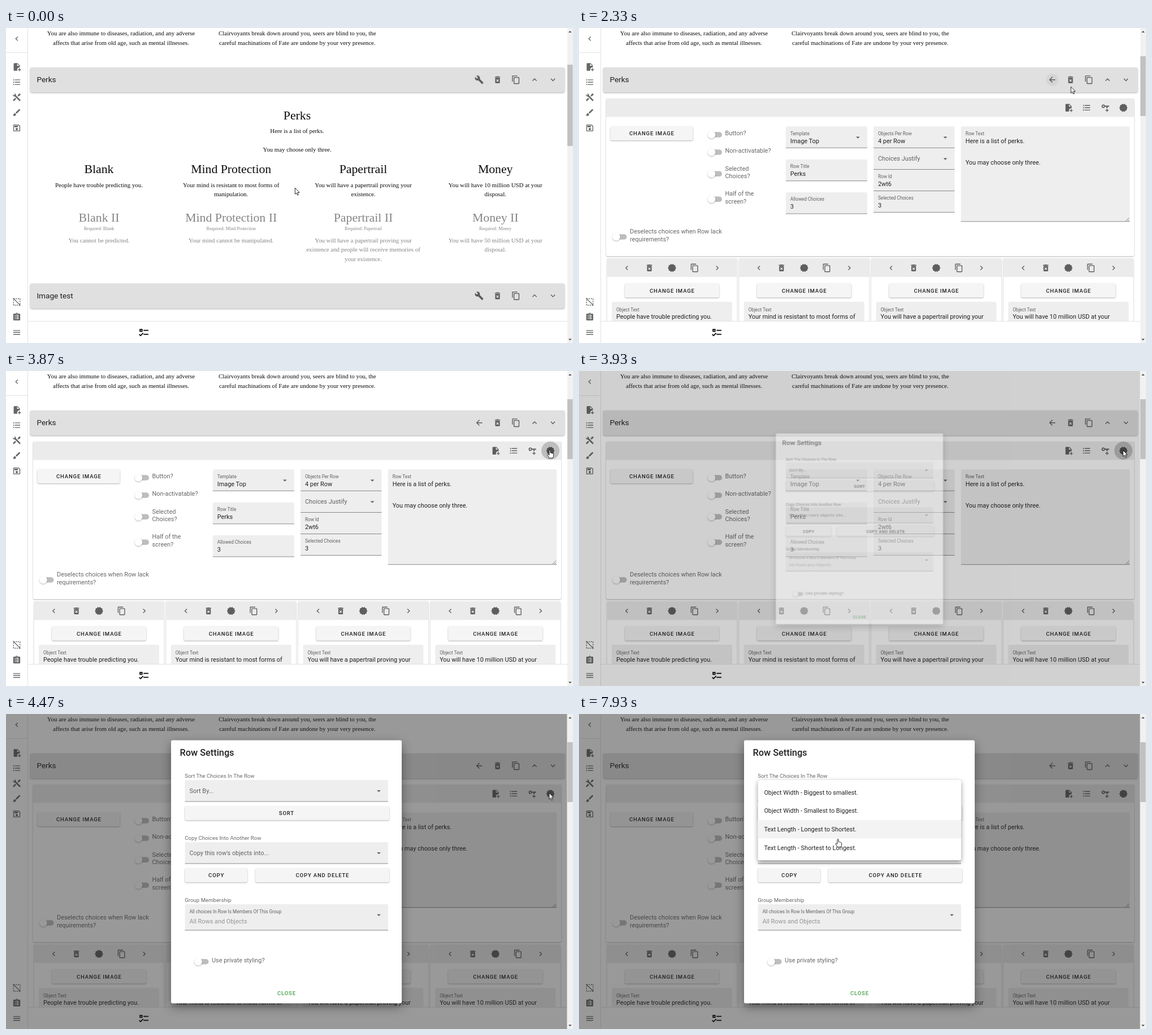
These frames come from a looping animation (1003x558 px, 8000 ms). An HTML page:

```html
<!DOCTYPE html>
<html lang="en">
<head>
<meta charset="utf-8">
<title>Row settings</title>
<style>
html, body { margin: 0; width: 100%; height: 100%; overflow: hidden; background: #fff; }
svg { display: block; }
text { font-family: Roboto, sans-serif; font-size: 10.88px; fill: rgba(0,0,0,.87); white-space: pre; }
.serif { font-family: "Liberation Serif", "Times New Roman", serif; fill: #0c0c0c; }
.h { font-size: 21.76px; }
.req { font-size: 8.16px; }
.bar { font-size: 13.6px; }
.small { font-size: 8.16px; fill: rgba(0,0,0,.6); }
.dim { fill: rgba(0,0,0,.6); }
.off { fill: rgba(0,0,0,.38); }
.btn { font-size: 9.52px; font-weight: 500; letter-spacing: .85px; }
.cap { font-size: 9.52px; letter-spacing: .068px; fill: rgba(0,0,0,.6); }
.title { font-size: 16.32px; font-weight: 500; }
.green { fill: #43a047; }
.mid { text-anchor: middle; }
.locked { opacity: .5; }
.icon { fill: rgba(0,0,0,.6); fill-rule: evenodd; }
.lift { filter: drop-shadow(0 1.5px 1.5px rgba(0,0,0,.32)); }
.card { filter: drop-shadow(0 1px 1.2px rgba(0,0,0,.3)); }
.deep { filter: drop-shadow(0 6px 9px rgba(0,0,0,.4)); }
.pop { filter: drop-shadow(0 3px 4px rgba(0,0,0,.4)); }

.anim { animation: 8s linear infinite; }
.step { animation-timing-function: step-end; }
#view { animation-name: view; }
#edit { animation-name: edit; }
#hover1 { animation-name: hover1; }
#ripple1 { animation-name: ripple1; transform-origin: 837px 92px; }
#back { animation-name: back; }
#keyHover { animation-name: keyHover; }
#gearHover { animation-name: gearHover; }
#shade { animation-name: shade; }
#dialog { animation-name: dialog; transform-origin: 496px 279.5px; }
#selHover { animation-name: selHover; }
#under { animation-name: under; transform-origin: 496px 0; }
#menu { animation-name: menu; }
#item { animation-name: item; }
#cursor { animation-name: move; }
#arrow { animation-name: arrow; }
#hand { animation-name: hand; }

@keyframes view { 0% { visibility: visible } 25.875%, 100% { visibility: hidden } }
@keyframes edit { 0% { visibility: hidden } 25.875%, 100% { visibility: visible } }
@keyframes hover1 {
  0%, 16% { opacity: 0 } 17%, 20.6% { opacity: .08 } 22.4%, 100% { opacity: .16 }
}
@keyframes ripple1 {
  0%, 20.4% { opacity: 0; transform: scale(.2) }
  22.4%, 100% { opacity: .1; transform: scale(1) }
}
@keyframes back { 0% { opacity: .12 } 46.625%, 100% { opacity: 0 } }
@keyframes keyHover {
  0%, 35.6% { opacity: 0 } 36.4%, 37.6% { opacity: .06 } 38.6%, 100% { opacity: 0 }
}
@keyframes gearHover {
  0%, 38.4% { opacity: 0 } 40%, 46.5% { opacity: .08 }
  48.5%, 49.2% { opacity: .2 } 52.4%, 100% { opacity: 0 }
}
@keyframes shade {
  0%, 48.5% { opacity: 0; animation-timing-function: cubic-bezier(.25,.8,.5,1) }
  52.25%, 100% { opacity: .46 }
}
@keyframes dialog {
  0%, 48.5% { opacity: 0; transform: scale(.5); animation-timing-function: cubic-bezier(.25,.8,.5,1) }
  52.25%, 100% { opacity: 1; transform: none }
}
@keyframes selHover { 0%, 61.5% { opacity: 0 } 63%, 100% { opacity: 1 } }
@keyframes under {
  0%, 74.75% { transform: scaleX(0) } 75% { transform: scaleX(.075) } 78.4%, 100% { transform: scaleX(1) }
}
@keyframes menu { 0%, 75.2% { opacity: 0 } 78.375%, 100% { opacity: 1 } }
@keyframes item {
  0% { transform: none } 91.9% { transform: translateY(32.6px) } 95.5%, 100% { transform: translateY(65.2px) }
}
@keyframes arrow {
  0% { visibility: visible } 16.1% { visibility: hidden } 27.3% { visibility: visible }
  35.8% { visibility: hidden } 48.5% { visibility: visible } 61.6%, 100% { visibility: hidden }
}
@keyframes hand {
  0% { visibility: hidden } 16.1% { visibility: visible } 27.3% { visibility: hidden }
  35.8% { visibility: visible } 48.5% { visibility: hidden } 61.6%, 100% { visibility: visible }
}
@keyframes move {
  0%, 6.625% { transform: translate(511px,283px); animation-timing-function: cubic-bezier(.4,.1,.4,1) }
  16.625%, 25.875% { transform: translate(837.5px,91px); animation-timing-function: cubic-bezier(.4,.1,.4,1) }
  35.875%, 36.625% { transform: translate(931px,128px); animation-timing-function: ease-out }
  40% { transform: translate(961px,138.5px) }
  42.5%, 49.2% { transform: translate(962px,140px) }
  52%, 55.875% { transform: translate(960.5px,139.5px); animation-timing-function: ease-in }
  58.75% { transform: translate(840px,159px) }
  62.5% { transform: translate(590px,135px); animation-timing-function: ease-out }
  65.875%, 66.625% { transform: translate(499px,142px); animation-timing-function: ease-out }
  68.375%, 90% { transform: translate(477.5px,140px); animation-timing-function: ease-in-out }
  92.5% { transform: translate(582px,160px); animation-timing-function: ease-in-out }
  95.6% { transform: translate(338px,190px); animation-timing-function: ease-in-out }
  99.125%, 100% { transform: translate(458px,221.5px) }
}
</style>
</head>
<body>
<svg id="stage" width="1003" height="558" viewBox="0 0 1003 558"></svg>
<script>
const dots = [6, 12, 18].map(y => `M4 ${y - 1.5}a1.5 1.5 0 1 1 0 3a1.5 1.5 0 1 1 0-3M7 ${y - 1}H21V${y + 1}H7Z`).join('');
const rows = [7, 11, 15].map(y => `M7 ${y}H9V${y + 2}H7ZM11 ${y}H17V${y + 2}H11Z`).join('');
const paths = {
  left: 'M15.41 16.58L10.83 12L15.41 7.41L14 6L8 12L14 18Z',
  right: 'M8.59 16.58L13.17 12L8.59 7.41L10 6L16 12L10 18Z',
  up: 'M7.41 15.41L12 10.83L16.59 15.41L18 14L12 8L6 14Z',
  down: 'M7.41 8.58L12 13.17L16.59 8.58L18 10L12 16L6 10Z',
  caret: 'M7 10L12 15L17 10Z',
  wrench: 'M22.7 19L13.6 9.9C14.5 7.6 14 4.9 12.1 3C10.1 1 7.1 .6 4.7 1.7L9 6L6 9L1.6 4.7C.4 7.1 .9 10.1 2.9 12.1C4.8 14 7.5 14.5 9.8 13.6L18.9 22.7C19.3 23.1 19.9 23.1 20.3 22.7L22.6 20.4C23.1 20 23.1 19.3 22.7 19Z',
  trash: 'M6 19A2 2 0 0 0 8 21H16A2 2 0 0 0 18 19V7H6ZM8.46 11.88L9.87 10.47L12 12.59L14.12 10.47L15.53 11.88L13.41 14L15.53 16.12L14.12 17.53L12 15.41L9.88 17.53L8.47 16.12L10.59 14ZM15.5 4L14.5 3H9.5L8.5 4H5V6H19V4Z',
  copy: 'M19 21H8V7H19M19 5H8A2 2 0 0 0 6 7V21A2 2 0 0 0 8 23H19A2 2 0 0 0 21 21V7A2 2 0 0 0 19 5M16 1H4A2 2 0 0 0 2 3V17H4V3H16Z',
  back: 'M20 11V13H8L13.5 18.5L12.08 19.92L4.16 12L12.08 4.08L13.5 5.5L8 11Z',
  list: dots,
  file: 'M14 2H6C4.89 2 4 2.89 4 4V20C4 21.11 4.89 22 6 22H13.81C13.28 21.09 13 20.05 13 19C13 15.69 15.69 13 19 13C19.34 13 19.67 13.03 20 13.08V8L14 2M13 9V3.5L18.5 9H13M23 20H20V23H18V20H15V18H18V15H20V18H23Z',
  tools: 'M21.71 20.29L20.29 21.71A1 1 0 0 1 18.88 21.71L7 9.85A3.81 3.81 0 0 1 6 10A4 4 0 0 1 2.22 4.7L4.76 7.24L7.24 4.76L4.7 2.22A4 4 0 0 1 10 6A3.81 3.81 0 0 1 9.85 7L21.71 18.88A1 1 0 0 1 21.71 20.29M2.29 18.88A1 1 0 0 0 2.29 20.29L3.71 21.71A1 1 0 0 0 5.12 21.71L10.59 16.25L7.76 13.42ZM20 2L16 4V6L13.83 8.17L15.83 10.17L18 8H20L22 4Z',
  brush: 'M20.71 4.63L19.37 3.29C19 2.9 18.35 2.9 17.96 3.29L9 12.25L11.75 15L20.71 6.04C21.1 5.65 21.1 5 20.71 4.63M7 14A3 3 0 0 0 4 17C4 18.31 2.84 19 2 19C2.92 20.22 4.5 21 6 21A4 4 0 0 0 10 17A3 3 0 0 0 7 14Z',
  save: 'M17 3H5C3.89 3 3 3.9 3 5V19C3 20.1 3.89 21 5 21H19C20.1 21 21 20.1 21 19V7L17 3M19 19H5V5H16.17L19 7.83ZM12 12C10.34 12 9 13.34 9 15S10.34 18 12 18 15 16.66 15 15 13.66 12 12 12M6 6H15V10H6Z',
  board: 'M19 3H14.82C14.4 1.84 13.3 1 12 1S9.6 1.84 9.18 3H5A2 2 0 0 0 3 5V19A2 2 0 0 0 5 21H19A2 2 0 0 0 21 19V5A2 2 0 0 0 19 3M12 3a1 1 0 1 1 0 2a1 1 0 1 1 0-2' + rows,
  menu: 'M3 6H21V8H3ZM3 11H21V13H3ZM3 16H21V18H3Z',
  gear: 'M23 12L20.56 9.22L20.9 5.54L17.29 4.72L15.4 1.54L12 3L8.6 1.54L6.71 4.72L3.1 5.53L3.44 9.21L1 12L3.44 14.78L3.1 18.47L6.71 19.29L8.6 22.47L12 21L15.4 22.46L17.29 19.28L20.9 18.46L20.56 14.78Z',
  key: 'M7 3.5a4.5 4.5 0 1 0 4.2 6H15V13H18V9.5H22V6.5H11.2A4.5 4.5 0 0 0 7 3.5M7 6a2 2 0 1 1 0 4a2 2 0 1 1 0-4M15.5 14.5V17.5H12.5V19.5H15.5V22.5H17.5V19.5H20.5V17.5H17.5V14.5Z',
  checks: 'M3 5H9V11H3V5M5 7V9H7V7H5M11 7H21V9H11V7M11 15H21V17H11V15M5 20L1.5 16.5L2.91 15.09L5 17.17L9.59 12.59L11 14Z'
};

const txt = (x, y, s, c = '') => `<text x="${x}" y="${y}" class="${c}">${s}</text>`;
const box = (x, y, w, h, fill, extra = '') => `<rect x="${x}" y="${y}" width="${w}" height="${h}" fill="${fill}" ${extra}/>`;
const icon = (name, x, y, size = 16.32, extra = '') =>
  `<path class="icon" ${extra} transform="translate(${x - size / 2} ${y - size / 2}) scale(${size / 24})" d="${paths[name]}"/>`;
const icons = (list, y) => list.map(([n, x]) => icon(n, x, y)).join('');
const disc = (id, x, y, r) => `<circle id="${id}" class="anim" cx="${x}" cy="${y}" r="${r}"/>`;
const button = (x, y, w, label) =>
  box(x, y, w, 25, '#f5f5f5', 'rx="2.7" class="card"') + txt(x + w / 2 + .4, y + 16, label, 'btn mid');
const toggle = (x, y) =>
  box(x - 6, y - 4.7, 24.5, 9.5, '#bdbdbd', 'rx="4.75"') +
  `<circle cx="${x}" cy="${y}" r="6.8" fill="#fff" class="card"/>`;
const plain = (x, y, w, h) =>
  `<path d="M${x} ${y + h}V${y + 2.7}q0-2.7 2.7-2.7H${x + w - 2.7}q2.7 0 2.7 2.7V${y + h}Z" fill="rgba(0,0,0,.065)"/>` +
  box(x, y + h - 1, w, 1, 'rgba(0,0,0,.42)');
const field = (x, y, w, label, value, caret) =>
  plain(x, y, w, 38.5) + txt(x + 8, y + 15.4, label, 'small') + txt(x + 8, y + 29.4, value) +
  (caret ? icon('caret', x + w - 16.5, y + 19.5) : '');
const select = (x, y, w, label) =>
  plain(x, y, w, 38.5) + txt(x + 8, y + 22.8, label, 'dim') + icon('caret', x + w - 16.5, y + 19.3);

const cols = [164.5, 398.2, 632, 865.7];
const tools = [['trash', 869.5], ['copy', 902], ['up', 935], ['down', 967.5]];
const rowBar = (y, name) =>
  box(43, y, 945, 44, '#e0e0e0', 'rx="2.7" class="lift"') + txt(54.4, y + 26.4, name, 'bar') + icons(tools, y + 21.7);

function perk(cx, name, lines, lines2) {
  const body = (arr, y) => arr.map((s, i) => txt(cx, y + i * 16.32, s, 'serif mid')).join('');
  return txt(cx, 257, name, 'serif h mid') + body(lines, 282) +
    `<g class="locked">${txt(cx, 343, name + ' II', 'serif h mid')}${txt(cx, 357.5, 'Required: ' + name, 'serif req mid')}${body(lines2, 380)}</g>`;
}

const page = [
  txt(203.5, 13.2, 'You are also immune to diseases, radiation, and any adverse', 'serif mid'),
  txt(203.5, 29.5, 'affects that arise from old age, such as mental illnesses.', 'serif mid'),
  txt(515.3, 13.2, 'Clairvoyants break down around you, seers are blind to you, the', 'serif mid'),
  txt(515.3, 29.5, 'careful machinations of Fate are undone by your very presence.', 'serif mid'),
  rowBar(70, 'Perks')
].join('');

const view = [
  disc('hover1', 837, 92, 16), disc('ripple1', 837, 92, 9),
  icon('wrench', 837, 91.7),
  txt(515, 161.6, 'Perks', 'serif h mid'),
  txt(515, 186.2, 'Here is a list of perks.', 'serif mid'),
  txt(515, 218.8, 'You may choose only three.', 'serif mid'),
  perk(cols[0], 'Blank', ['People have trouble predicting you.'], ['You cannot be predicted.']),
  perk(cols[1], 'Mind Protection', ['Your mind is resistant to most forms of', 'manipulation.'], ['Your mind cannot be manipulated.']),
  perk(cols[2], 'Papertrail', ['You will have a papertrail proving your', 'existence.'],
    ['You will have a papertrail proving your', 'existence and people will receive memories of', 'your existence.']),
  perk(cols[3], 'Money', ['You will have 10 million USD at your', 'disposal.'], ['You will have 50 million USD at your', 'disposal.']),
  rowBar(452.7, 'Image test'), icon('wrench', 837, 474.4)
].join('');

const objectCard = (cx, text) =>
  `<g class="card">${box(cx - 115, 408, 230, 160, '#fff', 'rx="2.7"')}</g>` + box(cx - 115, 408, 230, 33, '#ebebeb') +
  icons([['left', cx - 80], ['trash', cx - 40], ['gear', cx], ['copy', cx + 40], ['right', cx + 80]], 425) +
  button(cx - 83.5, 452.5, 167, 'CHANGE IMAGE') +
  plain(cx - 106.5, 485, 213, 80) + txt(cx - 98.5, 501.5, 'Object Text', 'small') + txt(cx - 98.5, 514.6, text);

const edit = [
  disc('back', 837, 91.7, 11), icon('back', 837, 91.7),
  box(48, 125, 934, 279, '#fff', 'rx="2.7" class="card"'), box(48, 125, 934, 32.5, '#ebebeb'),
  disc('keyHover', 931, 141, 16), disc('gearHover', 963, 141, 16),
  icons([['file', 866], ['list', 898], ['key', 931], ['gear', 963]], 141.3),
  button(55.5, 174, 146, 'CHANGE IMAGE'),
  toggle(234.5, 189), toggle(234.5, 220), toggle(234.5, 258.3), toggle(234.5, 303.3), toggle(66, 370),
  ...[[258.5, 190, 'Button?'], [258.5, 221, 'Non-activatable?'], [258.5, 252.7, 'Selected'], [258.5, 266.3, 'Choices?'],
    [258.5, 297.3, 'Half of the'], [258.5, 311, 'screen?'],
    [90, 363.9, 'Deselects choices when Row lack'], [90, 377.5, 'requirements?']].map(a => txt(...a, 'dim')),
  field(365.8, 174.3, 144, 'Template', 'Image Top', true),
  field(365.8, 232.8, 144, 'Row Title', 'Perks'),
  field(365.8, 291, 144, 'Allowed Choices', '3'),
  field(521, 174.3, 143.5, 'Objects Per Row', '4 per Row', true),
  select(521, 212.5, 143.5, 'Choices Justify'),
  field(521, 250.5, 143.5, 'Row Id', '2wt6'),
  field(521, 288.5, 143.5, 'Selected Choices', '3'),
  plain(675.7, 174.3, 298.5, 169),
  txt(683.7, 189.7, 'Row Text', 'small'), txt(683.7, 203.7, 'Here is a list of perks.'), txt(683.7, 241.8, 'You may choose only three.'),
  '<path d="M967 342L973 336M970.5 342L973 339.5" stroke="#666" stroke-width=".8"/>',
  objectCard(cols[0], 'People have trouble predicting you.'),
  objectCard(cols[1], 'Your mind is resistant to most forms of'),
  objectCard(cols[2], 'You will have a papertrail proving your'),
  objectCard(cols[3], 'You will have 10 million USD at your')
].join('');

const frame = [
  box(38, 519, 955, 1, '#e4e4e4'), box(38, 520, 955, 38, '#fff'),
  icon('checks', 244.1, 539.2, 20.9, 'style="fill:#000"'),
  box(0, 0, 38, 558, '#fff'), box(38, 0, 1, 558, '#e2e2e2'), box(0, 43, 38, 1, '#e2e2e2'),
  ...[['left', 19], ['file', 69], ['list', 96], ['tools', 122.7], ['brush', 149.7], ['save', 177], ['board', 512], ['menu', 539.3]]
    .map(([n, y]) => icon(n, 19, y)),
  '<g fill="none" stroke="#666" stroke-width="1.3"><rect x="13.3" y="479.5" width="11.5" height="11.5" stroke-dasharray="2.2 1.63"/><path d="M12.5 478.5L25.5 491.5"/></g>'
].join('');

const thumb = (y, h) => box(993, y, 9.5, h, '#c1c1c1');
const scroll = box(993, 0, 10, 558, '#f1f1f1') +
  '<path d="M995 8L997.8 5L1000.6 8ZM995 550.5L997.8 553.5L1000.6 550.5Z" fill="#505050"/>';

const dialog = [
  box(292, 46.5, 408, 466, '#fff', 'rx="2.7" class="deep"'),
  txt(307.5, 74, 'Row Settings', 'title'),
  txt(316.3, 113.3, 'Sort The Choices In The Row', 'cap'),
  select(316.5, 117, 359.5, 'Sort By...'),
  `<g id="selHover" class="anim">${box(316.5, 117, 359.5, 37.5, 'rgba(0,0,0,.075)')}${box(316.5, 154.5, 359.5, 1, 'rgba(0,0,0,.6)')}</g>`,
  '<g id="under" class="anim">' + box(316.5, 154, 359.5, 1.5, '#111') + '</g>',
  button(316.5, 163, 361.5, 'SORT').replace('x="497.65"', 'x="496.4"'),
  txt(316.3, 223, 'Copy Choices Into Another Row', 'cap'),
  select(316.5, 227, 359.5, "Copy this row's objects into..."),
  button(316.5, 273, 110.5, 'COPY'), button(441, 273, 237, 'COPY AND DELETE'),
  txt(316.3, 332.8, 'Group Membership', 'cap'),
  plain(316.5, 337, 359.5, 46.5),
  txt(324.5, 353.2, 'All choices In Row Is Members Of This Group', 'small'),
  txt(324.5, 370.7, 'All Rows and Objects', 'off'), icon('caret', 659.5, 356),
  toggle(340, 438.7), txt(364, 440, 'Use private styling?', 'dim'),
  txt(496.4, 498.4, 'CLOSE', 'btn mid green')
].join('');

const options = ['Object Width - Biggest to smallest.', 'Object Width - Smallest to Biggest.',
  'Text Length - Longest to Shortest.', 'Text Length - Shortest to Longest.'];
const menu = box(316.5, 117, 359.5, 142, '#fff', 'rx="2.7" class="pop"') +
  '<g id="item" class="anim step">' + box(316.5, 122.6, 359.5, 32.6, '#f3f3f3') + '</g>' +
  options.map((s, i) => txt(327.4, 142.7 + i * 32.6, s)).join('');

const pointer = (id, d) => `<path id="${id}" class="anim step" d="${d}" fill="#fff" stroke="#111" stroke-width=".9" stroke-linejoin="round"/>`;
const cursor =
  pointer('arrow', 'M.3 .3V11.4L2.8 9.1L4.5 13.1L6.4 12.3L4.7 8.4H8.1Z') +
  pointer('hand', 'M-1.1 1.3a1.1 1.1 0 0 1 2.2 0V5.2c.9-.6 1.8-.4 2 .4 .9-.5 1.8-.1 1.9.7 .9-.3 1.6.1 1.6 1V10c0 2-1.2 2.6-1.2 4.2H-1.4C-1.6 12-4 10-4.2 8.4c0-1.2 1.2-1.2 2.1-.3l1 1Z');

document.getElementById('stage').innerHTML = `
  ${page}${scroll}
  <g id="view" class="anim step">${view}${thumb(65, 144)}</g>
  <g id="edit" class="anim step">${edit}${thumb(50, 106)}</g>
  ${frame}
  <rect id="shade" class="anim" width="992.5" height="558" fill="#212121"/>
  <g id="dialog" class="anim">${dialog}</g>
  <g id="menu" class="anim">${menu}</g>
  <g id="cursor" class="anim">${cursor}</g>`;
</script>
</body>
</html>
```
